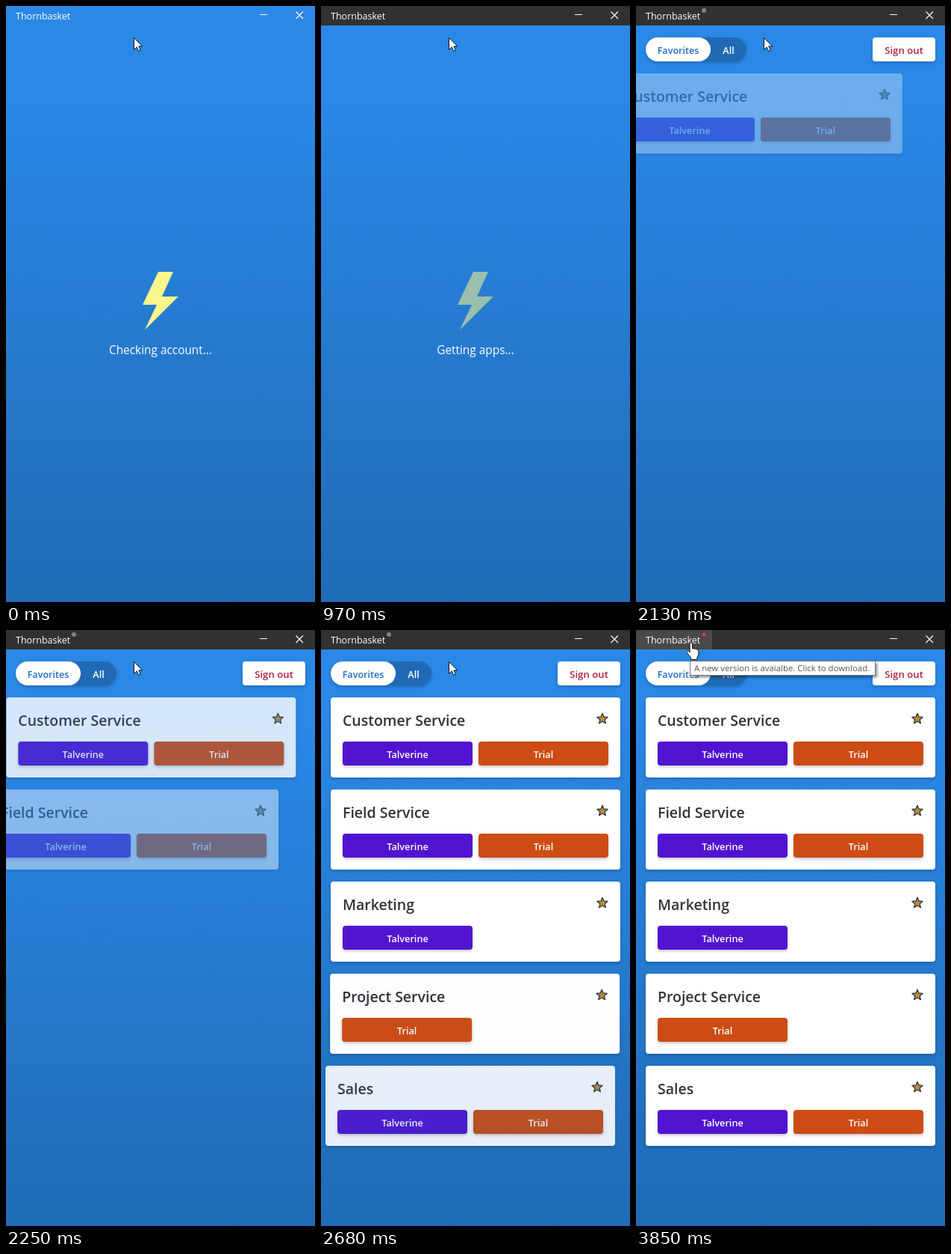
Animation, 414 px wide and 796 px high, one loop 5.06 s. Source, as an HTML page:

```html
<!DOCTYPE html>
<html lang="en">
<head>
<meta charset="utf-8">
<title>Launcher</title>
<style>
  html, body { margin: 0; width: 100%; height: 100%; overflow: hidden; background: #2479ce; }
  svg { display: block; width: 100%; height: 100%; }
  text { font-family: "Open Sans", "Noto Sans", sans-serif; fill: #fff; }
  .semi { font-weight: 600; }
  .mid { text-anchor: middle; }
  .soft { filter: drop-shadow(0 2px 2px rgba(0, 0, 0, .22)); }
</style>
</head>
<body>
<svg id="stage" viewBox="0 0 414 796"></svg>
<script>
const LOOP = 5060;
const CARD_START = 2084, CARD_STAGGER = 97, FLY_TIME = 400;
const DRIVE = ["Talverine", "#5014d0"];
const TRIAL = ["Trial", "#cc4c14"];
const CARDS = [
  ["Customer Service", DRIVE, TRIAL],
  ["Field Service", DRIVE, TRIAL],
  ["Marketing", DRIVE],
  ["Project Service", TRIAL],
  ["Sales", DRIVE, TRIAL],
];

const clamp = v => Math.min(1, Math.max(0, v));
const ramp = (t, from, to) => clamp((t - from) / (to - from));
const cubicOut = u => 1 - (1 - u) ** 3;
const mix = (a, b, u) => a + (b - a) * u;

const box = (x, y, w, h, r, fill, cls = "") =>
  `<rect x="${x}" y="${y}" width="${w}" height="${h}" rx="${r}" fill="${fill}" class="${cls}"/>`;
const label = (x, y, size, text, cls = "", fill = "#fff", id = "") =>
  `<text id="${id}" x="${x}" y="${y}" font-size="${size}" class="${cls}" style="fill:${fill}">${text}</text>`;

function star(cx, cy) {
  const points = Array.from({ length: 10 }, (_, i) => {
    const angle = i * Math.PI / 5 - Math.PI / 2, r = i % 2 ? 3.3 : 7.4;
    return `${(cx + r * Math.cos(angle)).toFixed(2)},${(cy + r * Math.sin(angle)).toFixed(2)}`;
  });
  return `<polygon points="${points.join(" ")}" fill="#c98a2c" stroke="#363b48" stroke-width="1.4" stroke-linejoin="round"/>`;
}

function card([title, ...buttons], i) {
  const y = 90 + i * 123;
  const row = buttons.map(([text, fill], k) => {
    const x = 29 + k * 182;
    return box(x, y + 59, 174, 32, 4, fill, "soft") + label(x + 87, y + 81, 12.7, text, "semi mid");
  }).join("");
  return `<g class="card">${box(13, y, 388, 107, 4, "#fff", "soft")}
    ${label(29, y + 38, 19.5, title, "semi", "#323338")}${star(377, y + 28.7)}${row}</g>`;
}

document.getElementById("stage").innerHTML = `
  <defs><linearGradient id="sky" x2="0" y2="1">
    <stop offset=".14" stop-color="#2a88e7"/><stop offset="1" stop-color="#206bb5"/>
  </linearGradient></defs>
  ${box(0, 0, 414, 796, 0, "url(#sky)")}
  <g id="loading">
    <polygon id="bolt" points="204,355 224,355 209,388 231,388 186,432.5 202,399 183,399" fill="#faf68c"/>
    ${label(207, 465, 15.4, "", "mid", "#fff", "status")}
  </g>
  <g id="header">
    <g class="soft">${box(13, 42, 135, 32, 16, "#206ab5")}</g>
    ${box(13, 42, 87, 32, 16, "#fff")}
    ${label(56.5, 63.5, 12.6, "Favorites", "semi mid", "#2070c4")}
    ${label(124, 63.5, 12.6, "All", "semi mid")}
    ${box(317, 42, 84, 32, 4, "#fff", "soft")}
    ${label(359, 63.5, 13.2, "Sign out", "semi mid", "#ad2148")}
  </g>
  ${CARDS.map(card).join("")}
  <g id="bar">${box(0, 0, 414, 26, 0, "#32312f")}</g>
  <g id="hover">${box(0, 0, 102, 26, 0, "#4a4947")}</g>
  ${label(13, 18, 12.5, "Thornbasket")}
  <circle id="dot" cx="91" cy="6" r="3"/>
  <path d="M340 11.5h10M388.5 7.5l9.5 9.5M398 7.5l-9.5 9.5" stroke="#fff" stroke-width="1.1" fill="none"/>
  <g id="tip">
    <g style="filter:drop-shadow(3px 3px 1.5px rgba(0,0,0,.4))">${box(72.5, 41.5, 248, 19, 0, "#fff")}</g>
    <rect x="72.5" y="41.5" width="248" height="19" fill="#fff" stroke="#767676"/>
    ${label(78, 55, 11.42, "A new version is avaialbe. Click to download.", "", "#575757")}
  </g>
  <g id="cursor" fill="#fff" stroke="#111" stroke-linejoin="round">
    <path id="arrow" d="M.5 .5V16.3L4.2 12.8L6.6 18.2L9.2 17.1L6.8 11.8H11.8Z"/>
    <path id="hand" d="M-.9 13V1.6a1.7 1.7 0 0 1 3.4 0V8q1.6-1.2 3 .3q1.7-.9 2.9 .6q2.3-.3 2.5 2V16l-2 4v2.5H.5V20L-4.8 13.2q-.8-2.2 1-2.5q1.2 0 2.9 2.3Z"/>
  </g>`;

const el = Object.fromEntries([...document.querySelectorAll("svg [id]")].filter(n => n.id).map(n => [n.id, n]));
const cards = [...document.querySelectorAll(".card")];

const fade = (node, opacity) => node.setAttribute("opacity", opacity.toFixed(3));
const show = (node, on) => node.setAttribute("visibility", on ? "visible" : "hidden");

function fly(node, u, dx, dy) {
  const eased = cubicOut(u);
  fade(node, eased);
  node.setAttribute("transform", `translate(${dx * (1 - eased)} ${dy * (1 - eased)})`);
}

// The pulse stalls while the app is busy.
function pulseTime(t) {
  if (t >= 510 && t < 590) return 510;
  if (t >= 770 && t < 970) return 770;
  if (t >= 970 && t < 1430) return 970;
  return t;
}

function draw(t) {
  show(el.bar, t >= 50);
  fade(el.bolt, .775 + .225 * Math.cos(pulseTime(t) / 1000 * Math.PI));
  el.status.textContent = t < 590 ? "Checking account..." : "Getting apps...";
  fade(el.loading, 1 - ramp(t, 1400, 1700));

  fly(el.header, ramp(t, 1708, 2108), 0, -16);
  cards.forEach((node, i) => {
    const start = CARD_START + i * CARD_STAGGER;
    fly(node, ramp(t, start, start + FLY_TIME), -64, 0);
  });

  const hovered = t >= 3060;
  fade(el.hover, ramp(t, 3020, 3160));
  fade(el.dot, ramp(t, 1840, 2040));
  el.dot.setAttribute("fill", hovered ? "#d8386c" : "#85837f");
  el.dot.setAttribute("r", hovered ? 2.4 : 3);

  const across = ramp(t, 2860, 3010), up = ramp(t, 3010, 3160);
  const x = mix(mix(171, 100, across), 73, up);
  const y = mix(mix(42, 31, across), 17, up);
  el.cursor.setAttribute("transform", `translate(${x} ${y})`);
  show(el.arrow, !hovered);
  show(el.hand, hovered);

  fade(el.tip, t < 3670 ? 0 : ramp(t, 3630, 3850));
}

const begin = performance.now();
function tick() {
  draw((performance.now() - begin) % LOOP);
  requestAnimationFrame(tick);
}
tick();
</script>
</body>
</html>
```
